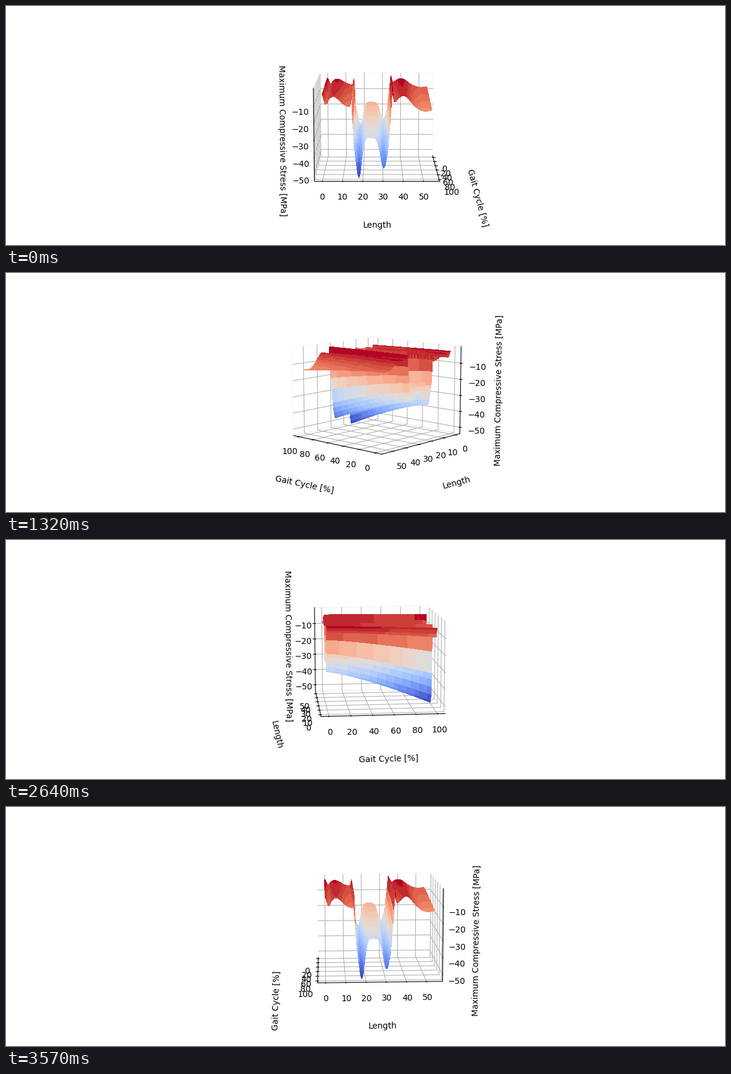
These frames come from a looping animation (1200 by 400 pixels, 3.6 s). A matplotlib script:

```python
import numpy as np
import matplotlib.pyplot as plt
from matplotlib.animation import FuncAnimation

FRAMES = 120
INTERVAL = 30
LEFT_RIM, RIGHT_RIM = 14.5, 34.5


def bump(y, center, width):
    return np.exp(-((y - center) / width) ** 2)


def profile(y):
    """Stress along the length at the start of the gait cycle."""
    shelf = (-7 + 3.8 * bump(y, 5.5, 4.5) + 4.2 * bump(y, 40, 4.5)
             + 3.6 * bump(y, 0, 1) - 1.2 * bump(y, 2, 1)
             - 1.5 * bump(y, 51, 5))
    rims = 4.1 * bump(y, LEFT_RIM, 0.4) + 5.24 * bump(y, RIGHT_RIM, 0.6)
    basin = -18 - 14.7 * bump(y, 18, 2) - 11.2 * bump(y, 30.4, 2.3)
    wall = np.clip(y - LEFT_RIM, 0, 1) * np.clip((RIGHT_RIM - y) / 2, 0, 1)
    return (shelf + rims) * (1 - wall) + basin * wall


gait = np.linspace(0, 100, 26)
length = np.linspace(0, 54, 109)
X, Y = np.meshgrid(gait, length, indexing="ij")
load = 1 + 0.62 * (X / 100) ** 1.3
Z = profile(Y) * load

fig = plt.figure(figsize=(12, 4), dpi=100)
ax = fig.add_subplot(projection="3d")
ax.plot_surface(X, Y, Z, rstride=1, cstride=1, linewidth=0,
                antialiased=False, cmap=plt.get_cmap("coolwarm", 32))
ax.set_xlabel("Gait Cycle [%]", labelpad=20)
ax.set_ylabel("Length", labelpad=20)
ax.set_zlabel("Maximum Compressive Stress [MPa]", labelpad=6)
ax.set_zticks(range(-50, 0, 10))
for axis in (ax.xaxis, ax.yaxis, ax.zaxis):
    axis.pane.fill = False


def update(frame):
    ax.view_init(elev=10, azim=frame * 360 / FRAMES)
    return []


anim = FuncAnimation(fig, update, frames=FRAMES, interval=INTERVAL,
                     init_func=lambda: update(0), repeat=True, blit=False)
plt.show()
```
